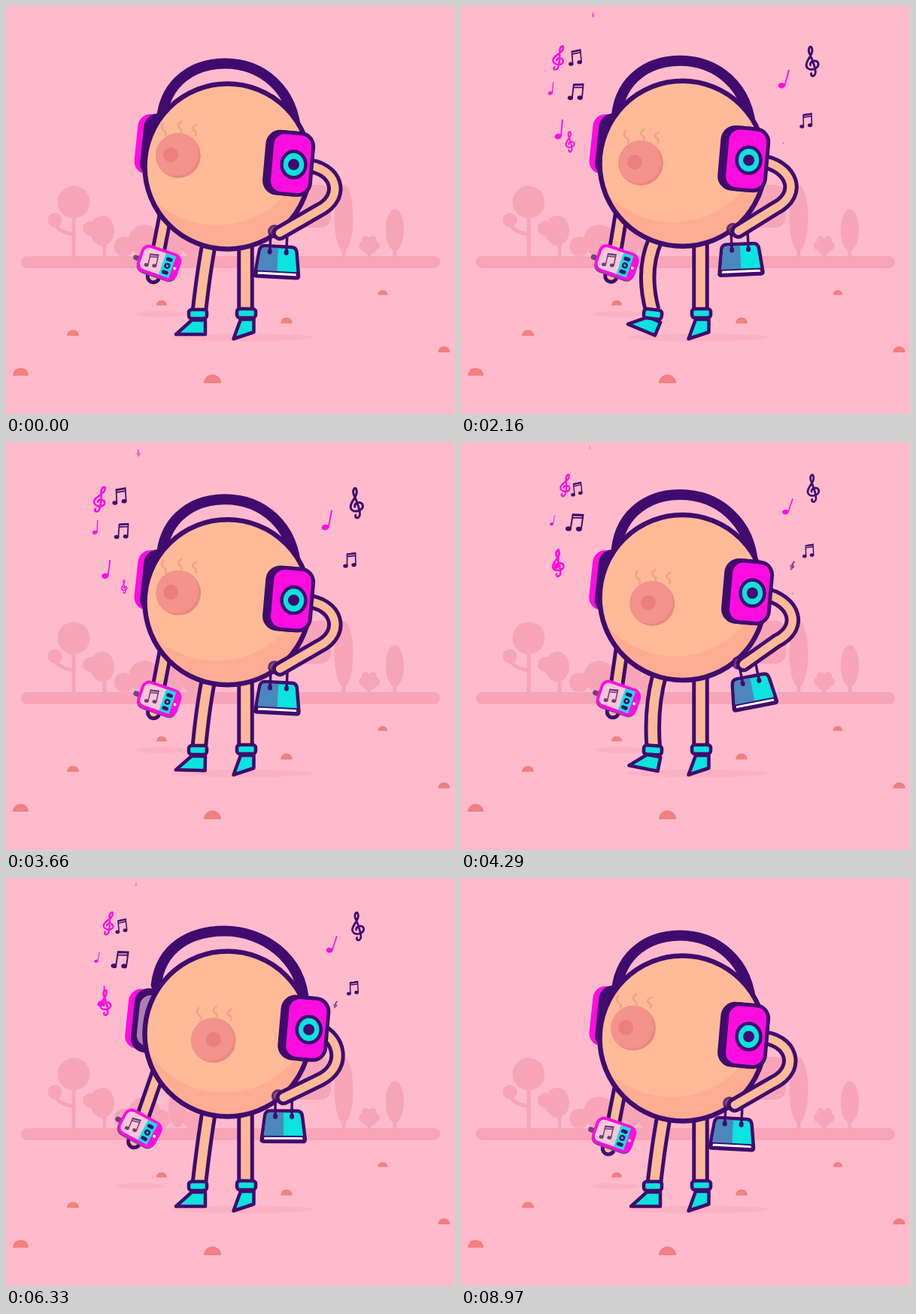
Animation of 597 by 543 pixels, one loop 9 s. Source, as an HTML page:

```html
<!DOCTYPE html>
<html lang="en">
<head>
<meta charset="utf-8">
<title>Music walk</title>
<style>
  html, body { margin: 0; width: 100%; height: 100%; overflow: hidden; background: #ffbbcb; }
  svg { display: block; width: 597px; height: 543px; }
  .tree { fill: #f8a5b8; stroke: #f8a5b8; stroke-width: 0; }
  .tree path { fill: none; stroke-width: 5; }
  .ink { stroke: #400b6e; stroke-linejoin: round; stroke-linecap: round; }
  .limb { fill: none; stroke: #400b6e; stroke-width: 22.5; }
  .skin { fill: none; stroke: #ffbb98; stroke-width: 12.5; }
  .arm { stroke-width: 20.5; stroke-linecap: round; stroke-linejoin: round; }
  .skin.arm { stroke-width: 10.5; }
  .shoe { fill: #0ae3de; stroke-width: 4.5; }
  .line { fill: none; }
</style>
</head>
<body>
<svg viewBox="0 0 597 543">
  <defs>
    <g id="single">
      <ellipse cx="-1.4" cy="3.7" rx="1.8" ry="1.4" fill="currentColor" transform="rotate(-18 -1.4 3.7)"/>
      <path d="M.1 3.5L.5 -5" stroke="currentColor" stroke-width=".7"/>
    </g>
    <g id="double">
      <ellipse cx="-3" cy="3.7" rx="1.6" ry="1.25" fill="currentColor"/>
      <ellipse cx="2.6" cy="3.2" rx="1.6" ry="1.25" fill="currentColor"/>
      <path d="M-1.9 3.7L-1.6 -4.2L4 -4.7L3.8 3.2M-1.7 -2.5L4 -3" fill="none" stroke="currentColor" stroke-width=".8"/>
      <path d="M-1.7 -4.6L4.2 -5.1V-3.9L-1.7 -3.4z" fill="currentColor"/>
    </g>
    <path id="treble" fill="none" stroke="currentColor" stroke-width=".75" stroke-linecap="round"
      d="M-1.2 4a.6 .6 0 1 0 .9 .8C1 4.5 .2 -1 -.2 -3C-.3 -4.7 1.4 -5.8 1 -3.5C.5 -1.5 -2.2 -.6 -2.2 1.2C-2.2 3.3 1.9 3.3 1.9 1.3C1.9 -.3 -.9 -.2 -.8 1.2"/>
    <clipPath id="ball"><circle cx="294.5" r="110"/></clipPath>
    <clipPath id="eyeClip"><circle r="30"/></clipPath>
  </defs>

  <rect width="597" height="543" fill="#ffbbcb"/>

  <g class="tree">
    <rect x="20" y="333" width="557" height="16" rx="8"/>
    <circle cx="90" cy="261" r="21.5"/><circle cx="65" cy="285" r="9.5"/>
    <path d="M90 275V335M65 288Q67 300 90 304"/>
    <circle cx="112" cy="296" r="10"/><ellipse cx="128" cy="299" rx="16" ry="20"/><path d="M131 310V335"/>
    <circle cx="157" cy="320" r="13"/><circle cx="184" cy="312" r="21"/><circle cx="205" cy="321" r="13"/>
    <ellipse cx="228" cy="306" rx="12" ry="26"/><circle cx="248" cy="322" r="12"/>
    <rect x="380" y="238" width="52" height="57" rx="14"/>
    <ellipse cx="449" cy="282" rx="12.5" ry="44"/><path d="M449 310V335"/>
    <circle cx="483" cy="319" r="11"/><circle cx="475" cy="319" r="6"/><circle cx="491" cy="319" r="6"/>
    <circle cx="478" cy="311" r="5"/><circle cx="488" cy="311" r="5"/><path d="M483 325V335"/>
    <ellipse cx="517" cy="298" rx="12" ry="28"/><path d="M517 315V335"/>
  </g>
  <g id="stones" fill="#f28080"></g>

  <g fill="#f6a3b6" opacity=".4">
    <ellipse cx="315" cy="441" rx="94" ry="5"/>
    <ellipse id="armShade" cy="410" rx="33" ry="4"/>
  </g>

  <path id="armL" class="limb arm"/><path id="armL2" class="skin arm"/>

  <path id="legL" class="limb"/><path id="legL2" class="skin"/>
  <g class="ink shoe">
    <path id="shoeL" d="M247 418H265V437H226Z"/>
    <rect id="cuffL" x="243" y="404" width="24" height="12" rx="4"/>
  </g>
  <path class="limb" d="M318.500 300V404"/><path class="skin" d="M318.500 300V404"/>
  <g class="ink shoe">
    <path d="M312 417H329.500V434L302.500 443Z"/>
    <rect x="307" y="403" width="25" height="12" rx="4"/>
  </g>

  <path id="band" class="ink line" stroke-width="14"/>
  <g id="cupL">
    <rect width="45" height="80" rx="17" y="-40" fill="#ff0de0"/>
    <rect x="8" width="45" height="86" rx="19" y="-42" fill="#400b6e"/>
    <rect id="pad" width="36" height="68" rx="15" y="-33" fill="#ab7fb0"/>
  </g>

  <g id="body">
    <g clip-path="url(#ball)">
      <circle cx="294.5" r="110" fill="#ffad92"/>
      <circle id="light" cy="-44" r="122" fill="#ffbb98"/>
    </g>
    <circle class="ink line" cx="294.5" r="110" stroke-width="6.5"/>
  </g>
  <g id="eye">
    <g clip-path="url(#eyeClip)">
      <circle r="30" fill="#ed8783"/><circle cx="-3" cy="-3" r="30" fill="#f3938c"/>
    </g>
    <circle id="pupil" cy="-1" r="10" fill="#ec7f7c"/>
    <path class="line" stroke-linecap="round" stroke="#f6a48d" stroke-width="3"
      d="M-17 -27q2-5-3-7q-4-4 0-9M4 -30q2-5-3-7q-3-4 3-8M23 -27q2-5-3-7q-3-4 4-7"/>
  </g>

  <g id="bag" class="ink">
    <path d="M-18 -21H18Q24 -21 25 -14L29 17Q29 20 26 20H-26Q-30 20 -29 17L-25 -14Q-24 -21 -18 -21Z" fill="#0ae3de" stroke-width="4.5"/>
    <path d="M0 -19H-17Q-22 -19 -23 -13L-26 12H0Z" fill="#4b87bd" stroke="none"/>
    <path d="M-26 13H26L27 18H-27Z" fill="#fff" stroke-width="2"/>
    <path class="line" stroke-width="3.500" d="M-11 -13V-34Q-9 -44 0 -45Q10 -43 11 -34V-13"/>
    <path class="line" stroke-width="6" d="M-11 -14v1M11 -14v1"/>
  </g>
  <circle id="fist" r="7.500" fill="#6e3c6d" stroke="#400b6e" stroke-width="3" opacity=".8"/>
  <path id="armR" class="limb arm"/><path id="armR2" class="skin arm"/>

  <g id="cupR">
    <g transform="rotate(5)" class="ink" stroke-width="5">
      <rect x="-37" y="-42" width="54" height="82" rx="17" fill="#400b6e"/>
      <rect x="-31" y="-42" width="55" height="82" rx="17" fill="#ff0de0"/>
    </g>
    <ellipse class="ink" rx="16" ry="17.500" fill="#0ae3de" stroke-width="4.500"/>
    <circle r="7.500" fill="#400b6e"/>
  </g>

  <g id="phone">
    <path d="M-24 3H-31" stroke="#6d4480" stroke-width="7" stroke-linecap="round"/>
    <rect x="-27" y="-18" width="55" height="38" rx="10" fill="#7d4190"/>
    <rect x="-25.500" y="-17.500" width="52" height="34" rx="9" fill="#fbc6d8" stroke="#ff0de0" stroke-width="4"/>
    <path d="M5 -15.500H19V14.500H5Z" fill="#0ae3de"/>
    <path d="M19 -15.500H22Q25 -14 25 -8V8Q25 13 19 14.500Z" fill="#ff0de0"/>
    <circle cx="22.500" r="2" fill="#fff"/>
    <path d="M10 -9h4M10 9h4" class="ink" stroke-width="5"/>
    <circle cx="12" r="4" fill="#400b6e"/><circle cx="12" r="1.500" fill="#0ae3de"/>
    <use href="#double" transform="translate(-10 0) rotate(-8) scale(1.9)" color="#6a3f78"/>
  </g>
  <g id="notes"></g>
</svg>

<script>
const LOOP = 9000;
const STEP = 1800;              // one sway of the body
const TAP_STEPS = 3;            // sways with a tapping foot; the rest swing the arm
const BEAT = STEP / 3.5, FIRST_BEAT = 1320;
const INK = '#400b6e', PINK = '#ff0de0';

const $ = id => document.getElementById(id);
const set = (id, name, value) => $(id).setAttribute(name, value);
const place = (id, x, y, r = 0) => set(id, 'transform', `translate(${x} ${y}) rotate(${r})`);

// Rises from 0 to 1 and falls back over u = 0..1; a skew below 1 peaks earlier.
const swell = (u, skew = 1) => (1 - Math.cos(2 * Math.PI * u ** skew)) / 2;

function limb(id, d) {
  set(id, 'd', d);
  set(id + '2', 'd', d);
}

function drawBody(t) {
  const u = t % STEP / STEP;
  const tapping = t < TAP_STEPS * STEP;
  const sway = swell(u), lift = swell(u, .8);
  const tap = tapping ? swell(2 * u) : 0;
  const swing = tapping ? 0 : swell(u, .6);
  const carry = tapping ? sway : swell(u, .75);
  const pulse = swell(Math.max(0, (u - .38) / .62), .6);
  const y = 213.500 - 6.500 * lift;

  place('body', 0, y);
  const pupil = -10 + (tapping ? 5.500 : 10) * sway;
  set('light', 'cx', 290 + pupil);
  place('eye', 229 + (tapping ? 29 : 47) * sway, 199 + 17 * Math.sqrt(sway));
  set('pupil', 'cx', pupil);

  const open = 13.500 * pulse, spread = open + 8 * sway ** 4;
  const earX = 382.500 + spread, earY = 211 - 10 * lift;
  place('cupL', 173 - open, 182 + .3 * open, 6);
  set('pad', 'x', 30 - 16 * pulse);
  place('cupR', earX, earY);
  const top = y - 137, left = 207 - .6 * open, right = 386 + .5 * spread;
  set('band', 'd', `M${left} ${top + 72}C${left + 6} ${top + 22} ${left + 45} ${top} 291 ${top}`
    + `C340 ${top} ${right - 3} ${top + 34} ${right} ${top + 96}`);

  const reach = (tapping ? 6 * lift : 0) - 35 * swing;
  const phoneX = 203 + reach, phoneY = 342 - lift - 11 * swing;
  limb('armL', `M${212 + .35 * reach} ${278 - 4 * lift - 24 * swing}L${phoneX - 7} ${phoneY + 18}`);
  place('phone', phoneX, phoneY, 19 + 13 * swing);
  set('armShade', 'cx', phoneX + 2);

  const handX = 364 + (tapping ? 13.500 : 5.500) * carry;
  const handY = 302 - (tapping ? 7 : 11) * carry;
  const e = (tapping ? 4 : 2) * carry;
  limb('armR', `M${earX + 15} ${earY + 1}C${440 + e} ${214 - e} ${452 + e} ${254 - 2 * e} ${416 + e} ${272 - 2 * e}L${handX} ${handY}`);
  place('fist', handX - 7, handY - 2);
  place('bag', 361 + (tapping ? 31 : 9) * carry, 341 - (tapping ? 9.500 : 11.500) * carry, 3 - (tapping ? 16 : 3) * carry);

  limb('legL', `M${270 - 13 * tap} ${y + 102}Q${263 - 25 * tap} 352 ${257 - 3 * tap} 405`);
  set('shoeL', 'transform', `rotate(${25 * tap} 258 420)`);
  set('cuffL', 'transform', `rotate(${8 * tap} 255 410)`);
}

// One note of each sort leaves the ear per beat and follows its curve; from and life are in beats.
const sorts = [
  { kind: 'treble', color: INK, lean: 14, from: .6, life: 1.85, size: 40, skew: 1, curve: [[425, 187], [490, 105], [445, 50], [494, 14]] },
  { kind: 'single', color: PINK, lean: -16, from: -.2, life: 1.65, size: 28, skew: .7, curve: [[414, 165], [432, 130], [418, 58], [490, 55]] },
  { kind: 'double', color: INK, lean: 4, from: -.25, life: 1.7, size: 20, skew: .85, curve: [[440, 203], [456, 172], [458, 135], [482, 114]] },
  { kind: 'treble', color: PINK, lean: -10, from: .5, life: 2.4, size: 40, skew: .5, curve: [[166, 200], [22, 81], [226, 20], [164, 5]] },
  { kind: 'single', color: PINK, lean: 10, from: .1, life: 2.3, size: 27, skew: .6, curve: [[158, 198], [112, 150], [112, 95], [138, 91]] },
  { kind: 'double', color: INK, lean: -8, from: -.1, life: 2.6, size: 26, skew: .85, curve: [[164, 157], [148, 100], [138, 70], [173, 33]] }
];

function bezier([a, b, c, d], u) {
  const w = 1 - u;
  return a.map((_, i) => a[i] * w ** 3 + 3 * b[i] * u * w * w + 3 * c[i] * u * u * w + d[i] * u ** 3);
}

for (const sort of sorts) {
  sort.copies = [0, 1, 2].map(() => {
    const el = document.createElementNS('http://www.w3.org/2000/svg', 'use');
    el.setAttribute('href', '#' + sort.kind);
    el.setAttribute('color', sort.color);
    return $('notes').appendChild(el);
  });
}

function drawNotes(t) {
  const now = (t - FIRST_BEAT) / BEAT;
  for (const { from, life, size, skew, lean, curve, copies } of sorts) {
    const newest = Math.floor(now - from);
    copies.forEach((el, i) => {
      const birth = newest - i + from, u = (now - birth) / life;
      const start = FIRST_BEAT + birth * BEAT;
      const shown = u < 1 && start > 0 && start + life * BEAT < LOOP;
      el.style.display = shown ? '' : 'none';
      if (!shown) return;
      const [x, y] = bezier(curve, u);
      const scale = size * Math.sin(Math.PI * u ** skew) / 10;
      const tilt = lean * Math.sin(u * life * 3.6 + 1);
      el.setAttribute('transform', `translate(${x} ${y}) rotate(${tilt}) scale(${scale})`);
    });
  }
}

const stones = [[89, 439, 8], [207, 398.5, 7], [19.5, 492, 10.5], [274.5, 502, 11.5], [373, 422.5, 8], [501, 384.5, 6.5], [582.5, 461, 8]];
$('stones').innerHTML = stones.map(([x, y, r]) => `<path d="M${x - r} ${y}a${r} ${r} 0 0 1 ${2 * r} 0z"/>`).join('');

const start = performance.now();
function frame() {
  const t = (performance.now() - start) % LOOP;
  drawBody(t);
  drawNotes(t);
  requestAnimationFrame(frame);
}
frame();
</script>
</body>
</html>
```
